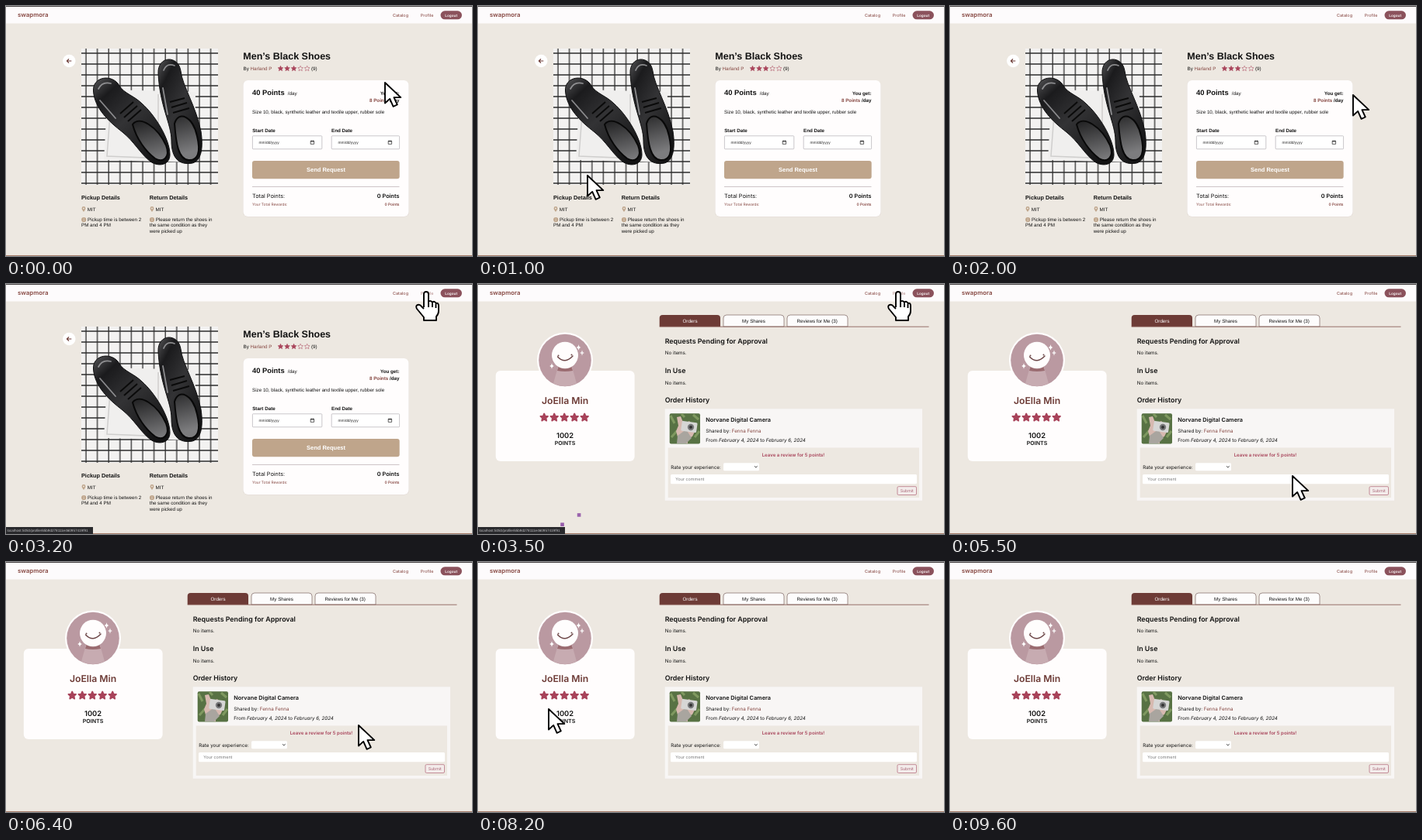
These frames come from a looping animation (600x323 px, 9700 ms). An HTML page:

```html
<!DOCTYPE html>
<html lang="en">
<head>
<meta charset="utf-8">
<title>Item sharing</title>
<style>
html, body { margin: 0; width: 100%; height: 100%; overflow: hidden; background: #ede8e1; }
svg { display: block; width: 600px; height: 323px; }
text { font: 6.25px "Liberation Sans", Arial, sans-serif; fill: #111; white-space: pre; text-rendering: geometricPrecision; }
.i { font-family: Inter, sans-serif; }
.b { font-weight: 700; }
.i.b { font-weight: 600; }
.m { text-anchor: middle; }
.e { text-anchor: end; }
.brown { fill: #854640; }
.rose { fill: #a8435a; }
.white { fill: #fff; }
.h { font-size: 8.85px; }
.nav { font-size: 5.5px; fill: #854640; }
.sub { font-size: 7.3px; }
.tiny { font-size: 4.85px; }
.date { font-size: 4.9px; fill: #222; }
.field { fill: #fff; stroke: #bdb9be; stroke-width: .8; }
.tan { fill: #bfa58b; }
.tab { fill: #fdfcfc; stroke: #8b7773; stroke-width: .8; }
.cur { fill: #fff; stroke: #000; stroke-width: 1.9; stroke-linejoin: round; }
</style>
</head>
<body>
<svg viewBox="0 0 600 323">
<defs>
  <pattern id="grid" x="97" y="55" width="14.6" height="14" patternUnits="userSpaceOnUse">
    <path d="M0 6H14.6M6 0V14" stroke="#2c2c2c" stroke-width="1.3"/>
  </pattern>
  <linearGradient id="leather" x2=".8" y2="1">
    <stop offset="0" stop-color="#555557"/><stop offset=".2" stop-color="#1b1b1d"/>
    <stop offset=".5" stop-color="#333335"/><stop offset="1" stop-color="#121213"/>
  </linearGradient>
  <linearGradient id="insole" x2=".4" y2="1">
    <stop offset="0" stop-color="#161617"/><stop offset="1" stop-color="#7c7c7e"/>
  </linearGradient>
  <path id="star" d="M0-4 1.2-1.4 4-1.2 1.9.8 2.5 3.6 0 2.1-2.5 3.6-1.9.8-4-1.2-1.2-1.4Z" stroke-linejoin="round"/>
  <path id="cal" d="M0 .8H4.4V4.8H0ZM0 1.5H4.4M1.1 0V1M3.3 0V1" fill="none" stroke="#222" stroke-width=".7"/>
  <path id="pin" class="tan" fill-rule="evenodd" d="M0 3.5C-1.6 1.2-2.4.2-2.4-1A2.4 2.4 0 0 1 2.4-1C2.4.2 1.6 1.2 0 3.5ZM0-2A1 1 0 0 0 0 0A1 1 0 0 0 0-2Z"/>
  <g id="info"><circle class="tan" r="3.1"/><path d="M0-.4V1.7M0-1.8V-1.1" stroke="#ede8e1" stroke-width=".8"/></g>
  <path id="spark" d="M0-4Q.4-.4 3 0Q.4.4 0 4Q-.4.4-3 0Q-.4-.4 0-4Z" fill="#fff"/>
</defs>

<rect width="600" height="323" fill="#ede8e1"/>
<rect width="600" height="22.5" fill="#fdfbfc"/>
<rect width="600" height="1" fill="#4a4547"/>
<rect y="322" width="600" height="1" fill="#a67d6a"/>
<text class="i b brown" x="15" y="14.3" style="font-size:7.8px">swapmora</text>
<text class="i nav" x="498" y="13.7">Catalog</text>
<text class="i nav" id="profile" x="533.7" y="13.7">Profile</text>
<rect x="559.5" y="6.3" width="27.5" height="11" rx="5.5" fill="#8b525c"/>
<text class="i b m white" x="573.2" y="13.6" style="font-size:4.65px">Logout</text>

<g id="item">
  <circle cx="81.3" cy="71" r="8.2" fill="#fff"/>
  <path d="M84.3 71H78.6M81 68.4 78.4 71 81 73.6" fill="none" stroke="#6d3b36" stroke-width="1.2"/>

  <rect x="97" y="55" width="176" height="176" fill="#f3f2f1"/>
  <rect x="97" y="55" width="176" height="176" fill="url(#grid)"/>
  <path d="M131 108 244 111 243 202 126 199Z" fill="#f0efee"/>
  <path d="M134 140 130 194 180 196M196 114V168" fill="none" stroke="#cfcecd" stroke-width="1.5"/>
  <g fill="url(#leather)" stroke="#0e0e0f">
    <path d="M112.500 110C111 91 137 87 146 103C152 113 165 116 175 126C192 141 211 172 211 192C211 206 196 208 186 201C173 191 165 175 150 163C132 149 114 132 112.500 110Z"/>
    <path d="M196 87C195 64 222 63 225 84C227 103 245 130 251 162C254 182 252 200 240 203C223 206 213 197 213 174C213 152 198 130 196 87Z"/>
  </g>
  <path d="M163 153C172 141 195 156 206 180C212 196 202 203 192 197C180 188 168 172 163 153Z M217 152C222 134 241 143 246 168C251 189 247 200 235 199C222 198 219 178 217 152Z" fill="url(#insole)" stroke="#080808" stroke-width="2"/>
  <path d="M147 139 164 124M152 144 169 129M157 149 174 134M211 124 230 119M213 131 233 125M215 138 236 132" stroke="#0a0a0a" stroke-width="2"/>
  <path d="M119 107Q124 97 135 100M203 83Q207 73 217 77M121 122 141 145M202 106 208 140" fill="none" stroke="#b5b5b8" stroke-width="1.800" stroke-linecap="round" opacity=".7"/>

  <text class="b sub" x="97" y="250.4">Pickup Details</text>
  <text class="b sub" x="184.7" y="250.4">Return Details</text>
  <use href="#pin" x="100" y="262.5"/><text x="104.7" y="264.9">MIT</text>
  <use href="#pin" x="188" y="262.5"/><text x="192.6" y="264.9">MIT</text>
  <use href="#info" x="100.2" y="276"/><text x="105" y="278.3">Pickup time is between 2</text>
  <text x="97" y="285.3">PM and 4 PM</text>
  <use href="#info" x="188" y="276"/><text x="192.8" y="278.3">Please return the shoes in</text>
  <text x="184.7" y="285.3">the same condition as they</text>
  <text x="184.7" y="292.5">were picked up</text>

  <text class="b" x="305.3" y="68.8" style="font-size:12.5px">Men’s Black Shoes</text>
  <text x="305.5" y="82.7">By <tspan class="brown">Harland P</tspan></text>
  <g id="rating" fill="#a8435a" stroke="#a8435a" stroke-width=".6"></g>
  <text x="393" y="82.7">(9)</text>

  <rect x="305" y="96.5" width="214" height="176" rx="6" fill="#e3dcd7"/>
  <rect x="305.5" y="96" width="213" height="176" rx="6" fill="#fffdfd"/>
  <text class="b" x="317" y="115.4" style="font-size:9.4px">40 Points</text>
  <text x="362.7" y="115.2">/day</text>
  <text class="b e" x="506.5" y="115.2">You get:</text>
  <text class="b e" x="506.5" y="123.7"><tspan class="brown">8 Points</tspan> /day</text>
  <text x="317" y="139.4">Size 10, black, synthetic leather and textile upper, rubber sole</text>
  <text class="b" x="317.2" y="162.6">Start Date</text>
  <text class="b" x="419" y="162.6">End Date</text>
  <rect class="field" x="317.4" y="167.8" width="89.4" height="17" rx=".8"/>
  <rect class="field" x="419.2" y="167.8" width="87.4" height="17" rx=".8"/>
  <text class="date" x="325.5" y="178.2">mm/dd/yyyy</text>
  <text class="date" x="427.5" y="178.2">mm/dd/yyyy</text>
  <use href="#cal" x="392.2" y="173.6"/><use href="#cal" x="492.2" y="173.6"/>
  <rect class="tan" x="317" y="200" width="189.7" height="23.2" rx="3"/>
  <text class="b m white" x="412" y="214.3" style="font-size:7.5px">Send Request</text>
  <path d="M317 233.5H506.5" stroke="#cdc4c7"/>
  <text class="i sub" x="317" y="248.4">Total Points:</text>
  <text class="i b e sub" x="506.5" y="248.4">0 Points</text>
  <text class="i brown tiny" x="317" y="258.2">Your Total Rewards:</text>
  <text class="i b e brown tiny" x="506.5" y="258.2">0 Points</text>
</g>

<g id="account">
  <rect x="22.8" y="112" width="178.8" height="117" rx="6" fill="#fffdfd"/>
  <circle cx="112" cy="98.5" r="36" fill="#fffdfd"/>
  <circle cx="112" cy="98.5" r="33.8" fill="#ba99a1"/>
  <path d="M103 107H121L127 128.5A33.8 33.8 0 0 1 97 128.5Z" fill="#c7abb1"/>
  <path d="M104 106H120L122 112Q112 114 102 112Z" fill="#9a6b70"/>
  <ellipse cx="112" cy="92" rx="17" ry="17.2" fill="#fffdfd"/>
  <path d="M102.5 94Q112 104 122 93" fill="none" stroke="#6d4748" stroke-width="1.5" stroke-linecap="round"/>
  <circle cx="103.5" cy="92.5" r="1" fill="#6d4748"/><circle cx="120.5" cy="91.5" r="1" fill="#6d4748"/>
  <use href="#spark" x="95" y="106"/><use href="#spark" x="129.5" y="82"/><use href="#spark" x="134" y="89" opacity=".8"/>
  <text class="i b m" x="112" y="155" style="font-size:12.2px;fill:#6d3b36">JoElla Min</text>
  <g id="score" fill="#a8435a" stroke="#a8435a" stroke-width="1.5"></g>
  <text class="i b m" x="112" y="199" style="font-size:9.3px">1002</text>
  <text class="i b m" x="112" y="208.4" style="font-size:7.1px">POINTS</text>

  <path d="M233.7 55V44Q233.7 40 237.7 40H308Q312 40 312 44V55Z" fill="#6d3b36"/>
  <path class="tab" d="M316 55V44Q316 40 320 40H390Q394 40 394 44V55Z"/>
  <path class="tab" d="M398 55V44Q398 40 402 40H472Q476 40 476 44V55Z"/>
  <path d="M233.7 55.2H580.5" stroke="#8d625d" stroke-width=".9"/>
  <text class="m white" x="273" y="49.8">Orders</text>
  <text class="m" x="355" y="49.8">My Shares</text>
  <text class="m" x="436.7" y="49.8">Reviews for Me (3)</text>

  <text class="i b h" x="240.7" y="76.6">Requests Pending for Approval</text>
  <text class="i" x="240.7" y="91.3">No items.</text>
  <text class="i b h" x="240.7" y="114.8">In Use</text>
  <text class="i" x="240.7" y="129.6">No items.</text>
  <text class="i b h" x="240.7" y="152.8">Order History</text>

  <rect x="240.7" y="161.3" width="331.3" height="118.5" fill="#f8f6f5"/>
  <rect x="244.7" y="211.5" width="323.3" height="64.5" fill="#ede8e1"/>
  <rect x="246.7" y="167.3" width="39.3" height="39.3" rx="2" fill="#587244"/>
  <path d="M248 170 253 180M277 169 284 175M249 198 256 190M279 198 285 190M262 168 266 172" stroke="#7f9960" stroke-width="3"/>
  <path d="M259 205 255 190 258 183 256 172 261 171 265 181 272 177 281 187 276 197 270 200 270 206Z" fill="#d7b9b0"/>
  <path d="M257 196 268 188 275 199 268 206H256Z" fill="#a9a59f"/>
  <rect x="262" y="178" width="20" height="13" rx="1.5" fill="#d6d6d5" transform="rotate(8 272 184)"/>
  <circle cx="274" cy="185" r="4.2" fill="#77787a"/><circle cx="274" cy="185" r="2" fill="#333"/>
  <text class="i b sub" x="293.3" y="177.8">Norvane Digital Camera</text>
  <text class="i" x="293.3" y="191.8">Shared by: <tspan class="brown">Fenna Fenna</tspan></text>
  <text class="i" x="293.3" y="204.2">From <tspan font-style="italic">February 4, 2024</tspan> to <tspan font-style="italic">February 6, 2024</tspan></text>
  <text class="i b m rose" x="406" y="223" style="font-size:6.1px">Leave a review for 5 points!</text>
  <text class="i" x="248.3" y="238.6">Rate your experience:</text>
  <rect x="316" y="231.2" width="46" height="10" rx="1.5" fill="#fff"/>
  <path d="M356 235.3 357.8 237 359.6 235.3" fill="none" stroke="#222" stroke-width=".9"/>
  <rect x="248" y="246" width="317" height="12.3" rx="1.5" fill="#fff"/>
  <text class="i" x="254.3" y="254.1" style="font-size:5.4px;fill:#777">Your comment</text>
  <rect x="540" y="261.7" width="24.5" height="10.8" rx="1.5" fill="#f3eceb" stroke="#b87483" stroke-width=".8"/>
  <text class="i m" x="552.2" y="269" style="font-size:5.2px;fill:#a96575">Submit</text>
</g>

<g id="status">
  <rect y="314" width="112" height="9" fill="#29292c"/>
  <text x="1.5" y="320.3" style="font-size:4.6px;fill:#c3c3c6">localhost:5050/profile/65b9d278111e460957419f91</text>
</g>
<g id="confetti"></g>

<g id="cursor">
  <path class="cur" id="arrow" d="M1 2V28.500L7.2 22.900 11.6 32.800 16.8 30.500 12.5 21.100H21.3Z"/>
  <path class="cur" id="hand" d="M-3 20V3Q-3 0 0 0Q3 0 3 3V13Q5 10.5 8 13.5Q11 11.5 12.5 15Q16 14 16 18V25Q16 29 13 32V37H-3V33L-12 22Q-14 18-11 17Q-8 16-6 19L-3 22M3 13V20M8 14V20M12.5 16V21"/>
  <g id="beam" fill="none">
    <path d="M-9-15H-4Q0-15 0-11V12Q0 16-4 16H-9M9-15H4Q0-15 0-11M0 12Q0 16 4 16H9" stroke="#000" stroke-width="4.8"/>
    <path d="M-7.5-15H-4Q0-15 0-11V12Q0 16-4 16H-7.5M7.5-15H4Q0-15 0-11M0 12Q0 16 4 16H7.5" stroke="#fff" stroke-width="1.3"/>
  </g>
</g>
</svg>
<script>
const LOOP = 9700, STEP = 100;
const $ = id => document.getElementById(id);
const show = (id, on) => { $(id).style.display = on ? "" : "none"; };
const rand = n => { const v = Math.sin(n * 12.9898) * 43758.5453; return v - Math.floor(v); };

// Cursor hot spot: time, x, y
const path = [
  [0, 487, 97], [200, 518, 118], [500, 350, 190], [800, 121, 251], [1000, 140, 217],
  [1300, 135, 150], [1600, 300, 110], [2000, 518, 113], [2400, 479, 93], [2500, 479, 93],
  [2900, 538, 13], [3200, 541, 10], [4100, 541, 10], [4500, 523, 11], [4700, 415, 204],
  [5100, 405, 225], [5500, 440, 246], [5900, 454, 240], [6400, 453, 209], [6500, 453, 209],
  [7000, 430, 203], [7500, 385, 208], [7900, 220, 200], [8200, 90, 188], [8500, 130, 194],
  [8700, 116, 212], [8900, 86, 205], [9400, 86, 205], [9500, 429, 47], [LOOP, 429, 47]
];

function cursorAt(t) {
  const k = path.findIndex(p => p[0] > t);
  const [t0, x0, y0] = path[k - 1], [t1, x1, y1] = path[k];
  const f = (t - t0) / (t1 - t0);
  return [x0 + (x1 - x0) * f, y0 + (y1 - y0) * f];
}

function starRow(id, x, y, gap, size, full) {
  $(id).innerHTML = [0, 1, 2, 3, 4].map(i =>
    `<use href="#star" transform="translate(${x + i * gap} ${y}) scale(${size})"${i < full ? "" : ' fill="none"'}/>`).join("");
}
starRow("rating", 353.5, 80.7, 8.55, 0.85, 3);
starRow("score", 85.2, 172.3, 13, 1.2, 5);

const colors = ["#9355a8", "#a8435a", "#8a4a55", "#bfa58b"];

function confettiAt(t) {
  let out = "";
  for (let i = 0; i < 30; i++) {
    const p = (t - 3420 - i * 44) / 800;
    if (p <= 0 || p >= 1) continue;
    const angle = (rand(i + 1) - 0.5) * 1.5;
    const dist = (110 + 80 * rand(i + 50)) * (1 - (1 - p) ** 2);
    const x = 115 + Math.sin(angle) * dist, y = 319 - Math.cos(angle) * dist;
    const color = colors[i < 2 ? 0 : Math.floor(rand(i + 90) * 4)];
    out += `<rect x="${x - 2.3}" y="${y - 2.3}" width="4.6" height="4.6" fill="${color}" opacity="${1 - p}"/>`;
  }
  return out;
}

function draw(now) {
  const t = Math.floor(now % LOOP / STEP) * STEP;
  const hand = t >= 2900 && t <= 4100 || t === 9500;
  const beam = t === 4700 || t === 4800;
  show("item", t < 3400);
  show("account", t >= 3400);
  show("status", t >= 2900 && t <= 4200);
  show("hand", hand);
  show("beam", beam);
  show("arrow", !hand && !beam);
  show("cursor", t < 9600);
  $("profile").style.opacity = hand && t < 9000 ? 0.6 : 1;
  $("cursor").setAttribute("transform", `translate(${cursorAt(t)})`);
  $("confetti").innerHTML = confettiAt(t);
  requestAnimationFrame(draw);
}
requestAnimationFrame(draw);
</script>
</body>
</html>
```
